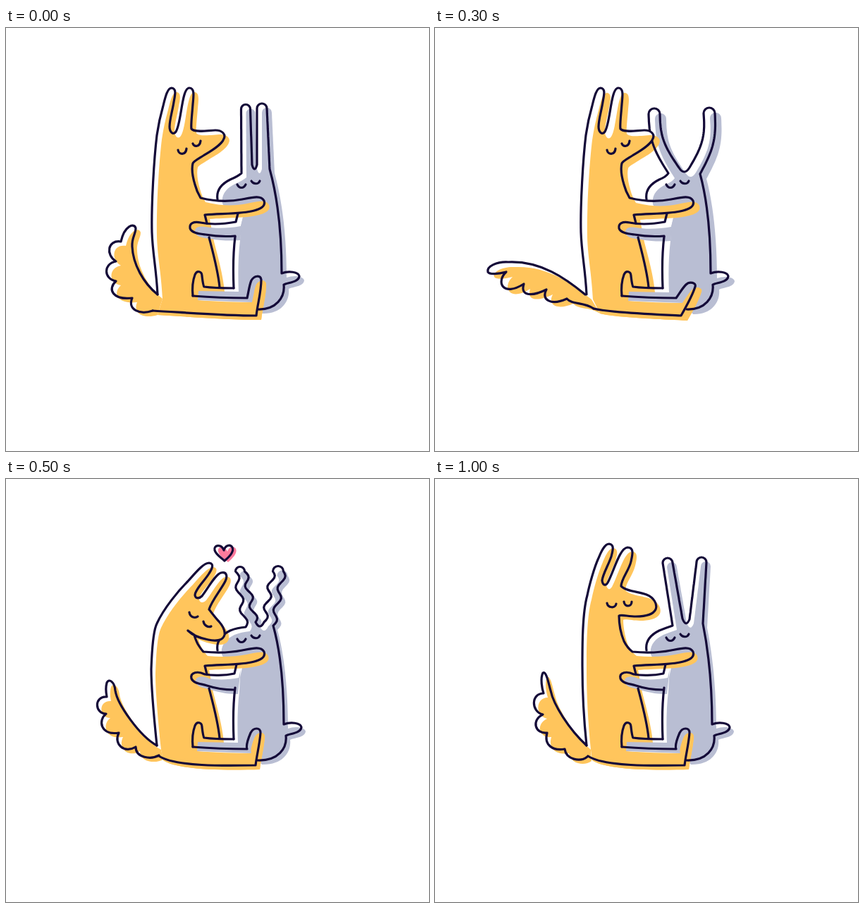
Animation of 600 by 600 pixels, one loop 1.1 s. Source, as an HTML page:

```html
<!DOCTYPE html>
<html lang="en">
<head>
<meta charset="utf-8">
<title>Hug</title>
<style>
  html, body { margin: 0; width: 100%; height: 100%; overflow: hidden; background: #fff; }
  svg { display: block; width: 100vw; height: 100vh; }
  .line { fill: none; stroke: #140a38; stroke-width: 3.2; stroke-linecap: round; stroke-linejoin: round; }
</style>
</head>
<body>
<svg viewBox="0 0 600 600">
  <mask id="behindFox" maskUnits="userSpaceOnUse" x="0" y="0" width="600" height="600">
    <rect width="600" height="600" fill="#fff"/>
    <path id="foxShape"/>
  </mask>
  <g id="fills">
    <path id="rabbitFill" fill="#b9bed3"/>
    <path id="foxFill" fill="#ffc55c"/>
    <path id="tailFill" fill="#ffc55c"/>
    <path id="armFill" fill="#b9bed3"/>
    <path fill="#b9bed3" d="M266 367L323 368L348 368L342 383L265 380Z"/>
    <path id="footFill" fill="#ffc55c"/>
  </g>
  <path id="heartFill" fill="#ff7a9c" transform="translate(5 2)"/>
  <g class="line">
    <path id="rabbitLine" mask="url(#behindFox)"/>
    <path id="rabbitEyes" d="M328 222C331 228 337 228 340 222M348 217C351 222 358 222 360 217"/>
    <path id="armLine"/>
    <path id="foxLine"/>
    <path id="foxEyes"/>
    <path id="tailLine"/>
    <path id="footLine"/>
    <path d="M265 380C264 370 265 358 268 350C271 343 278 345 278 352C279 360 280 366 281 367C295 369 310 369 323 369"/>
    <path d="M288 297C294 320 301 345 303 368"/>
    <path id="heartLine"/>
  </g>
</svg>
<script>
const $ = id => document.getElementById(id);

const heads = {
  upright: "M215 378C213 340 208 320 207 290C206 250 210 185 214 152C216 138 219 124 223 110C226 98 229 85 235 85" +
    "C242 86 240 94 238 105C236 118 232 130 232 140C232 147 237 153 241 147C249 135 249 85 260 85" +
    "C268 85 266 97 265 108C264 122 262 137 263 143C267 149 288 145 297 145C307 145 312 151 309 157" +
    "C306 166 290 175 280 181C272 186 266 189 265 192L265 192C263 200 265 212 268 222C270 230 273 236 276 241",
  nuzzle: "M214 378C208 320 206 290 206 270C207 240 209 215 214 205C224 183 245 158 258 145C268 134 280 119 288 119" +
    "C296 120 292 128 288 134C282 144 268 157 268 165C269 170 274 170 278 166C286 156 297 135 305 133" +
    "C314 131 314 139 311 145C305 157 292 172 288 185C292 190 298 198 302 202C309 210 311 215 310 221" +
    "C308 230 296 230 287 228C276 226 264 221 258 215L267 221C268 226 270 230 272 234C275 239 277 242 280 245",
  snug: "M215 378C209 330 207 290 207 260C208 235 208 213 214 205C224 185 240 168 252 157C265 145 280 126 287 126" +
    "C295 126 292 135 288 142C283 152 270 164 269 171C270 176 274 175 277 172C285 163 295 144 303 143" +
    "C312 143 310 151 307 157C302 168 290 178 286 187C292 192 299 200 304 206C310 212 313 217 310 224" +
    "C306 232 295 231 286 229C274 227 263 221 255 215L268 222C270 230 271 233 273 236C276 241 278 243 282 246",
  rising: "M215 378C211 340 209 300 209 265C209 235 209 190 216 165C219 150 226 125 232 112C235 105 240 92 247 92" +
    "C255 93 252 102 250 110C246 122 238 135 237 144C238 151 242 152 245 147C254 130 262 98 273 97" +
    "C283 97 280 108 278 117C275 130 264 142 264 152C270 159 290 160 300 164C310 168 316 177 313 185" +
    "C309 193 296 195 285 195C274 195 264 192 261 194L261 194C261 205 264 220 268 230C272 238 276 242 280 245"
};
const foxArm = "C300 247 320 246 335 243C350 240 362 237 366 245C369 253 360 257 352 259C335 264 305 263 282 265";
const openEyes = "M244 173C245 180 255 181 256 171M265 164C267 169 275 169 276 160";

const arms = {
  low: "M329 263L326 275C310 278 290 279 276 276C266 274 260 277 261 284C263 291 275 292 283 293C300 296 312 296 325 295",
  high: "M327 263L324 276C310 279 292 279 282 277C272 272 261 274 263 283C266 290 275 290 285 293C300 298 312 299 323 299"
};

const legLine = "C290 382 320 383 342 383";
const feet = {
  up: "C344 375 345 365 348 358C352 351 361 350 362 357C362 375 357 390 355 408C310 408 260 404 208 401",
  flat: "C352 377 360 371 366 366C374 361 381 366 378 374C373 385 362 396 346 407C310 405 250 402 216 396",
  half: "C347 376 351 369 356 364C361 359 371 361 369 367C365 380 357 394 349 408C310 406 250 404 225 398",
  rest: "C340 378 344 367 347 360C351 352 361 352 361 360C360 375 356 390 354 406C310 407 240 408 217 393"
};

// Ear numbers: start x y, tip x y, tip radius, end x y, sideways bend, wave height
// shift: how far the colour is printed beside the lines
const poses = {
  start: {
    head: heads.upright, eyes: openEyes, foot: feet.up, arm: arms.low, side: "391", lids: "0", shift: "7 6",
    ear1: "334 206 340 115 6.5 349 194 0 0", ear2: "356 194 363 114 7 374 200 0 0",
    tail: "M215 378C195 362 180 335 179 310C178 298 184 292 184 284C182 276 168 280 163 303C144 300 141 322 156 331" +
      "C138 334 138 356 156 359C143 371 152 386 179 383C172 400 190 407 208 401"
  },
  low: {
    head: heads.upright, eyes: openEyes, foot: feet.flat, arm: arms.low, side: "391", lids: "0", shift: "8 7",
    ear1: "332 205 339 117 7.5 348 195 -6 0", ear2: "361 196 366 115 9 374 207 8 0",
    tail: "M214 380C160 383 110 370 78 352C72 346 61 344 62 353C64 358 70 361 77 364C57 372 60 388 79 383" +
      "C78 398 108 402 118 393C124 410 150 406 157 399C160 418 190 412 216 396"
  },
  spread: {
    head: heads.upright, eyes: openEyes, foot: feet.half, arm: arms.low, side: "391", lids: "0", shift: "9 7",
    ear1: "331 206 311 122 8 346 198 -8 0", ear2: "361 198 389 121 8 376 207 8 0",
    tail: "M213 378C185 355 150 330 104 332C88 331 73 338 75 346C77 350 90 349 101 346C86 360 96 382 126 363" +
      "C120 382 140 380 158 371C150 386 165 394 187 384C195 393 210 388 225 398"
  },
  kiss: {
    head: heads.nuzzle, eyes: "M260 189C261 196 268 198 272 195M280 202C281 208 287 211 291 209",
    foot: feet.rest, arm: arms.high, side: "394", lids: "5", shift: "6 6",
    ear1: "340 210 332 131 6.5 354 203 0 4", ear2: "366 203 386 131 7.5 379 208 0 4",
    tail: "M214 378C190 365 158 320 155 300C154 288 146 282 143 289C141 296 142 304 143 309C124 308 126 333 142 333" +
      "C130 342 134 364 160 360C152 376 168 390 184 380C184 396 206 398 217 392",
    heart: "M309 101C305 91 294 94 296 101C298 108 306 112 310 116C316 111 324 103 321 97C318 92 311 94 309 101Z"
  },
  love: {
    head: heads.snug, eyes: "M262 188C259 198 268 205 274 197M281 203C281 210 289 212 294 207",
    foot: feet.rest, arm: arms.high, side: "394", lids: "6", shift: "6 6",
    ear1: "340 212 327 130 6.5 353 204 0 3", ear2: "366 204 386 128 7 379 212 0 3",
    tail: "M214 379C180 380 150 370 117 342C108 332 98 325 97 336C99 344 106 347 114 348C94 352 100 374 119 371" +
      "C106 386 125 400 147 388C143 407 168 408 174 401C180 410 202 408 213 394",
    heart: "M312 95C307 82 289 82 290 96C292 108 305 114 313 122C322 114 332 106 331 94C329 82 315 83 312 95Z"
  },
  end: {
    head: heads.rising, eyes: "M244 176C245 183 256 184 257 177M268 174C269 182 279 182 279 174",
    foot: feet.rest, arm: arms.high, side: "393", lids: "3", shift: "6 6",
    ear1: "337 208 330 119 7 351 198 0 0", ear2: "361 199 378 118 7 380 205 0 0",
    tail: "M215 378C190 355 168 320 164 300C161 290 158 272 153 275C149 283 152 298 154 304C136 304 136 330 153 334" +
      "C136 342 142 362 159 360C154 378 168 386 184 383C186 398 206 402 216 394"
  }
};

// Average the matching numbers of two strings
function blend(a, b) {
  const other = b.match(/-?[\d.]+/g);
  let i = 0;
  return a.replace(/-?[\d.]+/g, n => (+n + +other[i++]) / 2);
}

function between(a, b) {
  const pose = {};
  for (const key in a) if (key !== "heart") pose[key] = blend(a[key], b[key]);
  return pose;
}

function ear([x0, y0, tx, ty, r, x1, y1, bend, wave]) {
  const side = (ax, ay, bx, by, down) => {
    let d = "";
    for (let i = 0; i <= 24; i++) {
      const t = i / 24, s = down ? 1 - t : t;
      const x = ax + (bx - ax) * t + bend * Math.sin(Math.PI * s) + wave * Math.sin(5 * Math.PI * s);
      d += `L${x.toFixed(1)} ${(ay + (by - ay) * t).toFixed(1)}`;
    }
    return d;
  };
  return side(x0, y0, tx - r, ty) + `A${r} ${r} 0 0 1 ${tx + r} ${ty}` + side(tx + r, ty, x1, y1, true);
}

function rabbit({ ear1, ear2, side }) {
  const left = ear1.split(" ").map(Number), right = ear2.split(" ").map(Number);
  const x = +side;
  const notch = `Q${(left[5] + right[0]) / 2} ${Math.max(left[6], right[1]) + 12} ${right[0]} ${right[1]}`;
  return `M300 243C298 230 306 221 318 215Q328 211 ${left[0]} ${left[1]}` + ear(left) + notch + ear(right) +
    `C${x - 6} 240 ${x} 290 ${x} 348C${x + 10} 344 ${x + 24} 346 ${x + 25} 352` +
    `C${x + 24} 361 ${x + 8} 361 ${x + 3} 364C${x + 5} 382 ${x - 8} 400 357 399`;
}

function draw(pose) {
  const set = (id, d) => $(id).setAttribute("d", d);
  const move = (id, by) => $(id).setAttribute("transform", `translate(${by})`);
  const body = rabbit(pose), fox = pose.head + foxArm, heart = pose.heart || "";
  const foxShape = fox + "L288 297C294 320 301 345 303 368L270 368L265 380" + legLine + pose.foot + "Z";
  move("fills", pose.shift);
  move("rabbitEyes", "0 " + pose.lids);
  set("rabbitLine", body + "M325 296C322 320 322 345 323 369");
  set("rabbitFill", body + "L345 385L323 370C322 345 322 320 325 295L326 275L329 262L304 250Z");
  set("armLine", pose.arm);
  set("armFill", pose.arm + "Z");
  set("foxLine", fox + "L285 277");
  set("foxShape", foxShape);
  set("foxFill", foxShape);
  set("foxEyes", pose.eyes);
  set("tailLine", pose.tail);
  set("tailFill", pose.tail + "Z");
  set("footLine", "M265 380" + legLine + pose.foot);
  set("footFill", "M342 383" + pose.foot + "Z");
  set("heartLine", heart);
  set("heartFill", heart);
}

const { start, low, spread, kiss, love, end } = poses;
const timeline = [
  [0, start], [100, between(start, low)], [200, low], [300, spread], [400, between(spread, kiss)],
  [500, kiss], [700, love], [900, between(love, end)], [1000, end]
];

let shown;
function tick() {
  const time = performance.now() % 1100;
  const pose = timeline.filter(([from]) => from <= time).pop()[1];
  if (pose !== shown) draw(shown = pose);
  requestAnimationFrame(tick);
}
tick();
</script>
</body>
</html>
```
